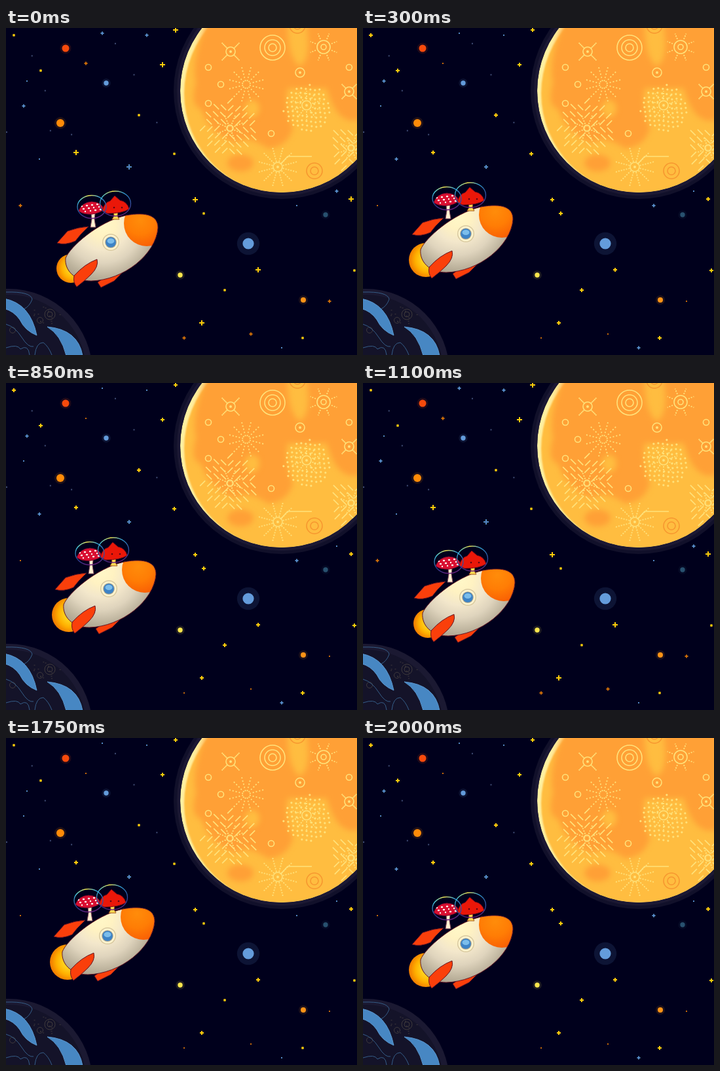
Write an HTML page with a canvas that moves like this. It is 536x499 px and loops after 2250 ms.

```html
<!DOCTYPE html>
<html lang="en">
<head>
<meta charset="utf-8">
<title>Mushroom rocket</title>
<style>
html, body { margin: 0; width: 100%; height: 100%; overflow: hidden; background: #00001c; }
canvas { display: block; }
</style>
</head>
<body>
<canvas id="stage" width="536" height="499"></canvas>
<script>
const W = 536, H = 499, TAU = Math.PI * 2;
const stage = document.getElementById('stage').getContext('2d');
const back = document.createElement('canvas');
back.width = W;
back.height = H;
let g = back.getContext('2d');

function oval(x, y, rx, ry, fill, edge, width = 1) {
  g.beginPath();
  g.ellipse(x, y, rx, ry, 0, 0, TAU);
  paint(undefined, fill, edge, width);
}

const disc = (x, y, r, fill) => oval(x, y, r, r, fill);
const ring = (x, y, r, edge, width = 1.6) => oval(x, y, r, r, null, edge, width);

function paint(path, fill, edge, width = 1) {
  const args = path ? [path] : [];
  if (fill) {
    g.fillStyle = fill;
    g.fill(...args);
  }
  if (edge) {
    g.strokeStyle = edge;
    g.lineWidth = width;
    g.stroke(...args);
  }
}

const shape = (d, fill, edge, width) => paint(new Path2D(d), fill, edge, width);

function within(path, draw) {
  g.save();
  g.clip(path);
  draw();
  g.restore();
}

function glow(x, y, r, ...colors) {
  const grad = g.createRadialGradient(x, y, 0, x, y, r);
  colors.forEach((c, i) => grad.addColorStop(i / (colors.length - 1), c));
  return grad;
}

function random(seed) {
  return () => (seed = seed * 16807 % 2147483647) / 2147483647;
}

// ---- Moon ----
const PALE = '#ffe27a', LIGHT = '#ffbd40', SEA = '#ffa036';
const moon = { x: 421, y: 96, r: 155 };

function burst(x, y, spokes, from, to, gap = 2) {
  g.save();
  g.setLineDash([2, gap]);
  for (let i = 0; i < spokes; i++) {
    const a = (i + 0.5) / spokes * TAU, c = Math.cos(a), s = Math.sin(a);
    g.beginPath();
    g.moveTo(x + c * from, y + s * from);
    g.lineTo(x + c * to, y + s * to);
    paint(undefined, null, PALE, 1.8);
  }
  g.restore();
}

// Visits the points of a staggered grid that lie in a round field.
function field(x, y, r, step, visit) {
  for (let j = -r; j <= r; j += step)
    for (let i = -r; i <= r; i += step) {
      const dx = i + j / step % 2, dy = j + i / step % 2;
      if (Math.hypot(dx, dy) < r && Math.hypot(dx, dy) > 9) visit(x + dx, y + dy, Math.sign(dx) || 1, Math.sign(dy) || 1);
    }
}

function lattice(x, y, r) {
  g.beginPath();
  field(x, y, r, 11, (px, py, sx, sy) => {
    g.moveTo(px - sx * 4, py - sy * 4);
    g.lineTo(px + sx * 4, py + sy * 4);
  });
  paint(undefined, null, PALE, 1.6);
  burst(x, y, 8, 3, r * 0.5);
  ring(x, y, 5, PALE);
}

function craters() {
  lattice(342, 153, 42);
  lattice(527, 183, 34);
  burst(343, 36, 4, 7, 19, 0.5);
  burst(485, 29, 8, 13, 22);
  burst(524, 97, 4, 7, 16, 0.5);
  burst(367, 86, 12, 5, 29, 3);
  burst(415, 212, 12, 8, 31);
  burst(459, 118, 10, 9, 22);
  field(459, 122, 36, 7, (x, y) => disc(x, y, 1.6, PALE));
  shape('M419 208L430 196H467', null, PALE, 1.6);
  for (const r of [6, 12, 19]) ring(407, 30, r, PALE);
  for (const r of [4, 10]) ring(485, 29, r, PALE);
  for (const [x, y] of [[309, 60], [328, 86], [309, 115], [405, 161], [524, 60]]) ring(x, y, 4.5, PALE);
  for (const [x, y] of [[343, 36], [449, 68], [524, 97], [459, 118], [415, 212]]) {
    ring(x, y, 7, PALE);
    disc(x, y, 2, PALE);
  }
  for (const r of [6, 12]) {
    ring(471, 218, r, '#f7972f');
    ring(445, -4, r, '#f7972f');
  }
}

function drawMoon() {
  const { x, y, r } = moon;
  disc(x, y, r + 10, '#11102a');
  disc(x, y, r + 5, '#1b1833');
  const edge = new Path2D();
  edge.arc(x, y, r, 0, TAU);
  within(edge, () => {
    disc(x, y, r, '#fff0a0');
    g.filter = 'blur(1px)';
    disc(x + 6, y + 4, r, LIGHT);
    g.filter = 'blur(4px)';
    shape('M308 -9H430Q430 45 448 58Q468 50 458 -9H540V140Q505 150 490 92H430Q425 120 438 152Q432 180 400 184Q370 162 350 176Q310 160 298 124Q280 118 290 84Q282 45 308 -9Z', SEA);
    oval(358, 206, 20, 13, SEA);
    oval(376, 123, 11, 13, LIGHT);
    g.filter = 'none';
    craters();
  });
}

// ---- Home planet and sky ----
function drawHome() {
  disc(4, 526, 128, '#1b1932');
  disc(4, 526, 119, '#141329');
  const rnd = random(11);
  for (const r of [4, 8]) ring(67, 437, r, '#3f3a3d', 1);
  for (const [x, y] of [[52, 446], [10, 461]]) ring(x, y, 4.5, '#3f3a3d', 1);
  g.fillStyle = '#3f3a3d';
  for (let i = 0; i < 16; i++) g.fillRect(42 + rnd() * 46, 424 + rnd() * 32, 2, 1);
  shape('M0 403Q38 402 40 414Q36 425 27 429M0 452Q14 456 24 472T42 486M0 488Q18 482 22 490Q34 482 36 499M44 499Q46 480 57 480Q65 486 70 499', null, '#355d87');
  const land = '#4787c3', shore = '#5b98d0';
  shape('M-3 413Q37 420 47 469Q29 462 21 445Q12 432 -3 428Z', land, shore);
  shape('M63 456Q110 460 117 500H92Q84 468 63 456Z', land, shore);
}

function drawSky() {
  g.fillStyle = '#00001c';
  g.fillRect(0, 0, W, H);
  const dot = (x, y, r, color) => {
    g.globalAlpha = 0.13;
    disc(x, y, r < 8 ? r + 3 : r * 2, color);
    g.globalAlpha = 1;
    disc(x, y, r, color);
  };
  dot(91, 31, 5.5, '#f64a0c');
  dot(83, 145, 6, '#ff8b08');
  dot(454, 415, 4, '#ff9316');
  dot(266, 377, 3.7, '#f9e64d');
  dot(153, 84, 3.7, '#639bdb');
  dot(488, 285, 3.7, '#28516f');
  dot(370, 329, 8.6, '#649cdb');
  const rnd = random(5);
  g.fillStyle = '#414e76';
  for (let i = 0; i < 8; i++) g.fillRect(rnd() * 250, rnd() * 240, 2, 2);
  drawMoon();
  drawHome();
}

// ---- Twinkling stars: arm length in the low, middle and high pose ----
const YELLOW = '#ffcd0a', BLUE = '#5489c4', AMBER = '#c96b08';
const stars = [
  [YELLOW, [1.5, 3, 1.5], '12,11 53,65 203,133 257,192 302,283 532,370 334,400 453,473'],
  [BLUE, [1, 2.5, 1], '32,81 51,200 444,271 421,488'],
  [YELLOW, [4, 3, 3], '259,3 107,190 289,262 527,261 299,450 385,369 239,56'],
  [BLUE, [2.5, 1, 1], '215,11 27,119 505,249 147,8'],
  [BLUE, [4, 3, 3], '188,212'],
  [AMBER, [2.5, 1, 1], '122,54 22,271 272,473 494,417 374,467'],
];

function twinkle(pose) {
  for (const [color, arms, places] of stars) {
    const r = arms[pose], t = r < 2 ? r : 1;
    g.fillStyle = color;
    for (const p of places.split(' ')) {
      const [x, y] = p.split(',').map(Number);
      g.fillRect(x - r, y - t, r * 2, t * 2);
      g.fillRect(x - t, y - r, t * 2, r * 2);
    }
  }
}

// ---- Rocket ----
const DARK = '#641422', RED = '#fa3f0b';
const hull = new Path2D('M91 351C98 334 140 296 183 286C216 280 232 287 232 305C229 345 180 385 130 386C104 386 89 369 91 351Z');

function helmet(x, y, rx, ry) {
  const grad = g.createConicGradient(0, x, y);
  ['#3450a0', '#64217c', '#64217c', '#27408f', '#46c8e0', '#f2e34c', '#329fd6', '#3450a0']
    .forEach((c, i, all) => grad.addColorStop(i / (all.length - 1), c));
  oval(x, y, rx, ry, null, grad, 1.3);
}

function mushrooms() {
  shape('M130 283H136L135 292L137 304H129L131 292Z', '#fff2d2', '#8d5263');
  const cap = new Path2D('M111 279Q116 266 131 265Q147 266 149 277Q144 282 132 284Q117 285 111 279Z');
  paint(cap, '#d90e31', '#7c0829');
  within(cap, () => {
    for (let i = 0; i < 22; i++) disc(114 + i * 13 % 34, 268 + i * 7 % 13, 1.2, '#fff1ee');
  });
  shape('M164 278H171L170 287L173 292H162L165 287Z', '#ffdc53', '#a45720');
  shape('M147 279Q150 266 159 264L166 256L174 263Q185 265 188 276Q178 283 155 283Z', '#ea1709', '#7c0916');
  for (const x of [165, 177]) disc(x, 274, 1.3, '#5b0714');
  helmet(131, 273, 22, 17.5);
  helmet(167, 268, 23.5, 19);
}

function rocket(flame) {
  disc(99, 367, flame, glow(103, 366, flame + 4, '#ffe22c', '#ffd21c', '#ffb000', '#f07800'));
  shape('M78 328L94 310Q110 304 126 303Q113 315 106 325Q90 332 78 328Z', RED, DARK);
  shape('M140 388L150 381L177 374L165 386L145 396Z', RED, DARK);
  paint(hull, glow(148, 300, 98, '#fff8c8', '#fff2c2', '#f3e7cb', '#dfd4bd', '#bdb39d', '#9f9784'));
  within(hull, () => disc(215, 298, 35, glow(205, 293, 44, '#ff8c0a', '#ff7d05', '#f85c04')));
  paint(hull, null, DARK);
  disc(160, 327, 13, '#d8c99f');
  disc(160, 327, 11.5, '#fff4ce');
  disc(160, 327, 8.8, '#aaa38e');
  disc(160, 327, 7.8, '#3d83c6');
  oval(160, 325, 5.5, 4, '#7bbdeb');
  shape('M104 378Q120 360 139 353Q142 364 130 376Q120 386 108 395Q102 388 104 378Z', RED, DARK);
  mushrooms();
}

drawSky();
g = stage;

const holds = [300, 250, 300, 250, 350, 300, 250, 250];
const bob = [0, 1, 2, 1];
const loop = holds.reduce((a, b) => a + b);
const start = performance.now();

function show(now) {
  let t = Math.max(0, now - start) % loop, step = 0;
  while (t >= holds[step]) t -= holds[step++];
  const pose = bob[step % bob.length];
  g.drawImage(back, 0, 0);
  twinkle(pose);
  g.save();
  g.translate(Math.round(-2.7 * pose), Math.round(-12.6 * pose));
  rocket(22 + Math.min(pose * 4, 5));
  g.restore();
  requestAnimationFrame(show);
}
show(start);
</script>
</body>
</html>
```
